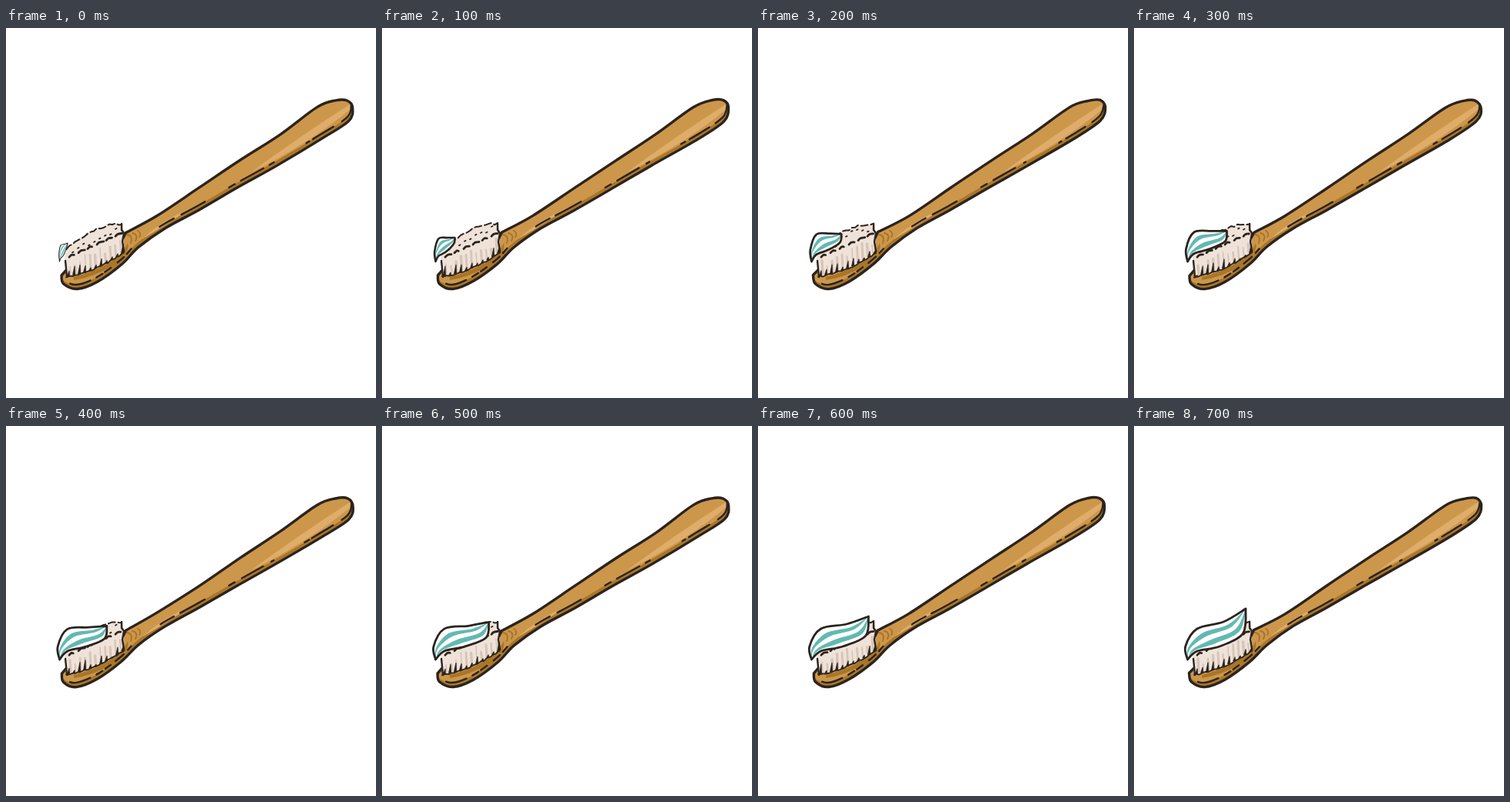
Animation of 480 by 480 pixels, one loop 0.8 s. Source, as an HTML page:

```html
<!DOCTYPE html>
<html lang="en">
<head>
<meta charset="utf-8">
<title>Toothbrush</title>
<style>
html, body { margin: 0; width: 100%; height: 100%; overflow: hidden; background: #fff; }
svg { display: block; width: 100vw; height: 100vh; }
</style>
</head>
<body>
<svg id="stage" viewBox="0 0 480 480" fill="none" stroke-linecap="round" stroke-linejoin="round"></svg>
<script>
const STEP = 100, STEPS = 8, POSES = 5;
const INK = '#2b231e', WOOD = '#cc974a', SHADE = '#a97629', LIGHT = '#dfad69',
      HAIR = '#efe2d8', HAIR_SHADE = '#d6c6b9', MINT = '#62b9b2';

// Key points of the brush: along the top to the tip, then back below to the head.
const TOP = [[156, 265], [196, 243], [251, 207], [303, 172], [355, 138], [404, 103], [428, 94], [443, 94]];
const UNDER = [[450, 104], [444, 121], [410, 144], [350, 179], [300, 207], [250, 236], [206, 260],
  [172, 284], [150, 306], [118, 329], [92, 338], [74, 332], [72, 321]];

// Ink and gap lengths along the rim, from the tip to the head.
const DASHES = [25, 9, 25, 5, 4, 40, 4, 9, 27, 8, 9, 28, 30, 8, 18, 38, 6, 6, 10, 8, 6, 5, 7, 8, 24];
const RIM_LENGTH = 375;

const stage = document.getElementById('stage');
const mix = (a, b, t) => a + (b - a) * t;
const text = points => points.map(p => p.map(v => v.toFixed(1)).join(' '));
const line = points => 'M' + text(points).join('L');
const fill = (d, color) => `<path d="${d}" fill="${color}"/>`;
const stroke = (d, color, width, extra = '') =>
  `<path d="${d}" stroke="${color}" stroke-width="${width}" ${extra}/>`;

// Returns a seeded source of values between -1 and 1.
function random(seed) {
  let s = seed * 7919 + 17;
  return () => (s = (s * 16807) % 2147483647) / 1073741823.5 - 1;
}

// Smooth segments through the points, without the opening move.
function segments(points) {
  return points.slice(1).map((c, i) => {
    const b = points[i], a = points[i - 1] || b, e = points[i + 2] || c;
    return 'C' + text([
      [b[0] + (c[0] - a[0]) / 6, b[1] + (c[1] - a[1]) / 6],
      [c[0] - (e[0] - b[0]) / 6, c[1] - (e[1] - b[1]) / 6], c]).join(' ');
  }).join('');
}
const curve = points => 'M' + text([points[0]])[0] + segments(points);

function handle(pose) {
  const rnd = random(pose + 1);
  const wobble = ([x, y]) => [x + rnd() * 0.7, y + rnd() * 0.7];
  const top = TOP.map(wobble), under = UNDER.map(wobble);
  const shape = curve([...top, ...under]) + 'L80 312L150 276Z';
  const rim = curve(under.slice(0, -1).map(([x, y]) => [x - 1.5, y - 5.5]));
  let shift = 0;
  const dashes = DASHES.map((v, i) => i % 2 ? v - shift : v + (shift = rnd() * 2));

  return `<clipPath id="body"><path d="${shape}"/></clipPath>` +
    fill(shape, SHADE) +
    `<g clip-path="url(#body)"><g transform="translate(-1.5 -5.5)">${fill(shape, WOOD)}</g></g>` +
    fill('M446 99Q385 138 318 187Q390 152 446 106Z', LIGHT) +
    fill('M240 234Q205 248 176 274Q196 263 240 234Z', LIGHT) +
    fill('M88 323Q132 312 153 288L158 279Q161 294 140 308Q112 324 88 327Z', SHADE) +
    stroke('M157 268Q165 269 162 279M164 266Q172 268 168 276M171 263Q176 266 173 271', SHADE, 2) +
    stroke(shape, INK, 3.4) +
    stroke(rim, INK, 2.4, `pathLength="${RIM_LENGTH}" stroke-dasharray="${dashes.map(v => v.toFixed(1))}"`);
}

const ridgeY = x => 299 - (x - 78) * 0.45;
const footY = x => 323 - (x - 78) * 0.42 + 5 * Math.sin((x - 78) / 75 * Math.PI);
const backY = x => 286 - 32 * Math.sin(Math.min(1, (x - 78) / 70) * Math.PI / 2);

function bristles(pose) {
  const rnd = random(pose + 31);
  const back = [], foot = [];
  for (let x = 78; x <= 150; x += 4) back.push([x, backY(x) + rnd() * 1.5]);
  for (let x = 153; x >= 78; x -= 3) foot.push([x, footY(x) + rnd()]);
  let out = fill(line([[76, 298], ...back, [153, 265], ...foot]) + 'Z', HAIR);

  for (let x = 83; x < 151; x += 6.5) {
    const y = mix(ridgeY(x), footY(x), 0.4 + rnd() * 0.2);
    out += stroke(line([[x, y], [x + 1, footY(x) - 3]]), HAIR_SHADE, 2.5 + rnd());
  }
  for (let x = 81; x < 152; x += 7) {
    const tall = 8 + rnd() * 6;
    out += fill(line([[x - 2, footY(x)], [x + 0.5, footY(x) - tall], [x + 1.5, footY(x) - tall], [x + 2, footY(x)]]) + 'Z', INK);
  }
  out += stroke(line(foot), INK, 1.8);

  for (let x = 82; x < 149; x += 12) {
    const end = x + 7 + rnd() * 2;
    out += stroke(curve([[x, ridgeY(x)], [x + 3, ridgeY(x + 3) - 1.5], [end, ridgeY(end)]]), INK, 2.8);
  }
  for (let x = 86; x < 148; x += 7) {
    const y = mix(backY(x), ridgeY(x), 0.5 + rnd() * 0.3);
    out += stroke(line([[x, y], [x + 1.5, y - 0.8]]), INK, 1.8);
  }
  return out + stroke(line(back), INK, 2, 'stroke-dasharray="9 4"') +
    stroke('M77 302L78 312L79 323M150 254L150 262L153 266L151 277L153 290', INK, 2.4);
}

// The paste unrolls from a fixed root; only its growth, 0 to 1, shapes it.
function paste(growth) {
  const width = 11 + 65 * Math.sin(growth * Math.PI / 2);
  const curl = (1 - growth) ** 4;
  const tipY = 264 + 15 * curl - 27 * growth ** 3;
  const at = (part, y) => [69 + width * part, y];
  const root = [69.5, 303], tip = at(1, tipY);
  const upper = [root, at(-0.03, 286 + 8 * curl), at(0.17, 263 + 19 * curl),
    at(0.62, 263 - (267 - tipY) * 0.3 + 14 * curl), tip];
  const lower = [root, at(0.17, 292 + 7 * curl), at(0.55, 286 + 8 * curl),
    at(0.95, mix(tipY, 283, 0.7)), tip];
  const between = t => upper.map(([x, y], i) => [mix(x, lower[i][0], t), mix(y, lower[i][1], t)]);
  const band = (t, u) => curve(between(t)) + segments(between(u).reverse()) + 'Z';

  return fill(band(0, 1), '#fff') + fill(band(0.24, 0.42), MINT) + fill(band(0.62, 0.82), MINT) +
    stroke(band(0, 1), INK, Math.min(2.8, width / 10));
}

let shown = -1;
function draw(time) {
  const step = Math.floor(time / STEP) % STEPS;
  if (step === shown) return;
  shown = step;
  const pose = step % POSES;
  stage.innerHTML = handle(pose) + bristles(pose) + paste(step / (STEPS - 1));
}

const start = performance.now();
function tick() {
  draw(performance.now() - start);
  requestAnimationFrame(tick);
}
tick();
</script>
</body>
</html>
```
